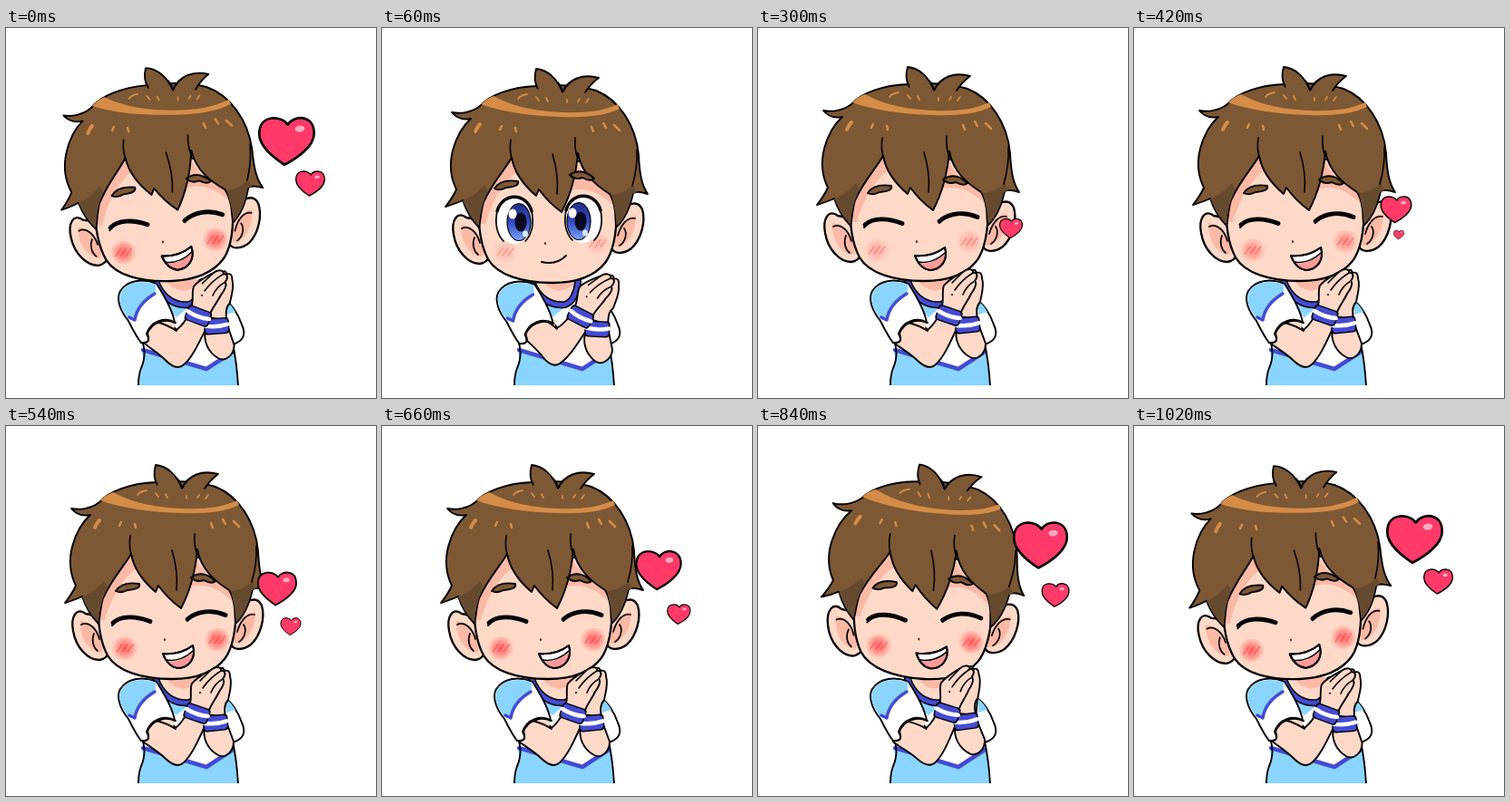
Recreate the animation shown at these times as an HTML page with a canvas. Size 408 by 408 pixels, loop 1.26 s.

```html
<!DOCTYPE html>
<html lang="en">
<head>
<meta charset="utf-8">
<title>Happy boy with hearts</title>
<style>
html, body { margin: 0; width: 100%; height: 100%; overflow: hidden; background: #fff; }
canvas { display: block; width: 408px; height: 408px; }
</style>
</head>
<body>
<canvas id="stage" width="408" height="408"></canvas>
<script>
const ctx = document.getElementById('stage').getContext('2d');
const LOOP = 1260, STEP = 60, LAST = 17;
const INK = '#000', HAIR = '#7d5834', DARK = '#664a30', GLOSS = '#d58c47';
const SKIN = '#fed9c8', SHADE = '#fbb9a6', BLUE = '#8ad5ff', NAVY = '#444bd3';

function shape(d, fill, stroke = INK, width = 1.9) {
  const p = new Path2D(d);
  if (fill) { ctx.fillStyle = fill; ctx.fill(p); }
  if (stroke) { ctx.strokeStyle = stroke; ctx.lineWidth = width; ctx.stroke(p); }
}
const line = (d, width = 1.9, color = INK) => shape(d, null, color, width);
const flat = (d, fill) => shape(d, fill, null);

function oval(x, y, rx, ry, fill, rot = 0) {
  ctx.beginPath();
  ctx.ellipse(x, y, rx, ry, rot, 0, Math.PI * 2);
  ctx.fillStyle = fill;
  ctx.fill();
}

function turned(x, y, angle, draw, dx = 0, dy = 0) {
  ctx.save();
  ctx.translate(x + dx, y + dy);
  ctx.rotate(angle);
  ctx.translate(-x, -y);
  draw();
  ctx.restore();
}

// keys: [step, ...values], linear between neighbours
function track(keys, t) {
  if (t < keys[0][0]) return null;
  let i = 0;
  while (i < keys.length - 2 && t > keys[i + 1][0]) i++;
  const a = keys[i], b = keys[i + 1];
  const k = Math.min(1, (t - a[0]) / (b[0] - a[0]));
  return a.slice(1).map((v, n) => v + (b[n + 1] - v) * k);
}

const BIG = [[4, 273, 231, 18], [5, 279, 221, 26], [9, 299, 179.5, 44],
  [12, 308, 149, 55], [14, 311.5, 131.5, 61], [17, 309.5, 125, 63]];
const SMALL = [[7, 292, 228, 12], [9, 314, 221, 23], [12, 334, 201, 28],
  [14, 328, 186.5, 31], [17, 335.5, 171.5, 33]];
const BLUSH = [[0, .25], [4, .3], [5, .38], [9, 1], [17, 1]];

// head tilt and arm tilt for each held pose
const POSES = {
  left: { head: -.047, arm: .025 },
  open: { head: 0, arm: .15, dx: 5, dy: 2, lift: -3, open: true },
  mid: { head: 0, arm: 0 },
  right: { head: .056, arm: -.035 }
};

function poseAt(s) {
  if (s === LAST) return POSES.left;
  if (s <= 3) return POSES.open;
  return s >= 12 && s <= 14 ? POSES.right : POSES.mid;
}

function torso() {
  flat('M165 282 C178 287 202 286 215 279 C232 284 248 291 253 306 L251 350 C254 366 256 380 256 394 L146 394 C146 378 153 370 152 358 L145 330 Z', '#fff');
  flat('M163 285 L170 304 L188 319 L200 309 Z', BLUE);
  flat('M150 357 L221 377 L252 357 C254 372 256 382 256 394 L146 394 C147 380 154 370 150 357 Z', BLUE);
  line('M151 355 L221 376 L250 357', 4.5, NAVY);
  line('M150 344 C153 353 154 364 149 375 Q146 383 146 394 M250 348 C253 362 255 378 256 395');
  const collar = 'M165 279 C171 297 186 307 202 305 C210 302 215 292 216 280';
  flat(collar, SKIN);
  flat('M176 277 C184 293 206 294 215 277 Z', SHADE);
  line(collar, 8);
  line(collar, 5, NAVY);
  // right sleeve
  shape('M242 300 C249 305 256 316 260 327 C265 338 262 345 250 349 L239 338 Z', '#fff');
  flat('M243 301 C247 304 250 308 253 313 L243 316 Z', BLUE);
}

function sleeve() {
  shape('M166 282 C150 275 133 279 126 290 C121 299 126 312 135 323 C140 333 144 341 149 347 C157 347 159 345 156 337 C160 326 174 319 186 325 C184 311 173 293 166 282 Z', '#fff');
  flat('M165 283 C150 277 134 280 127 291 C123 299 126 309 136 322 L141 321 C143 308 151 300 165 291 Z', BLUE);
  line('M136 319 L142 322 C144 309 152 300 164 293', 3.5, NAVY);
  line('M149 347 C157 348 159 345 155 337 C160 323 175 318 187 325');
}

function band(x, y, angle) {
  turned(x, y, angle, () => {
    const box = (w, h, fill) => {
      ctx.fillStyle = fill;
      ctx.beginPath();
      ctx.roundRect(x - w / 2, y - h / 2, w, h, 4);
      ctx.fill();
    };
    box(28, 18, INK);
    box(25.2, 15.4, NAVY);
    line(`M${x - 12.5} ${y - 1} Q${x} ${y + 2} ${x + 12.5} ${y - 1}`, 4.5, '#fff');
  });
}

function arms() {
  shape('M219 330 C216 345 223 357 234 363 C242 367 251 359 251 348 L244 329 Z', SKIN);
  shape('M156 336 C161 330 175 323 181 326 L187 333 C193 328 198 321 201 312 L223 323 C213 344 206 362 196 371 C190 377 182 373 174 365 C165 357 157 353 150 347 Z', SKIN);
  flat('M155 337 C160 326 175 320 186 325 L184 332 L160 343 Z', SKIN);
  line('M166 325 Q178 328 187 334');
  // hands
  shape('M221 318 C225 299 222 279 234 269 Q239 264 241 270 Q247 268 247 276 C250 285 246 295 245 302 C240 307 241 314 242 321 Z', SKIN);
  shape('M202 309 C206 300 202 291 205 284 C211 277 219 273 226 269 C232 264 238 266 237 270 C242 269 243 274 239 279 C242 281 239 288 235 293 C231 302 224 309 222 319 Z', SKIN);
  line('M237 270 C229 275 221 283 217 289 M239 279 C232 283 228 289 226 294 M226 269 L214 281', 1.6);
  oval(214, 294, 1, 1, INK);
  band(231, 327.5, -.1);
  band(210.5, 317, .33);
}

function blush(x, y, level) {
  const g = ctx.createRadialGradient(x, y, 1, x, y, 15);
  g.addColorStop(0, `rgba(255,70,75,${.75 * level})`);
  g.addColorStop(.5, `rgba(255,95,95,${.52 * level})`);
  g.addColorStop(1, 'rgba(255,130,120,0)');
  oval(x, y, 15, 13, g);
  for (let i = -1; i <= 1; i++) {
    const cx = x + i * 6;
    line(`M${cx - 3} ${y + 4} L${cx + 3} ${y - 4}`, 1.5, `rgba(250,60,70,${.25 + .25 * level})`);
  }
}

function openEye(x, y, side) {
  const ix = x - side * 5, iy = y + 2;
  oval(x, y, 20, 26, '#fff');
  const g = ctx.createLinearGradient(0, iy - 20, 0, iy + 20);
  g.addColorStop(0, '#242e88');
  g.addColorStop(.5, '#3348bd');
  g.addColorStop(1, '#78a2ff');
  oval(ix, iy, 13.6, 21, INK);
  oval(ix, iy, 12.4, 20, g);
  oval(ix + 2, iy, 6.5, 10.5, '#080a20');
  oval(ix - 7, iy - 9, 4.5, 5.5, '#fff');
  oval(ix + 7, iy + 13, 3, 3.5, '#d9e8ff');
  line(`M${x - 19} ${y - 10} C${x - 13} ${y - 31} ${x + 13} ${y - 31} ${x + 19} ${y - 10}`, 3.4);
  for (const k of [-1, 1])
    line(`M${x + k * 19} ${y - 10} C${x + k * 22} ${y + 4} ${x + k * 19} ${y + 16} ${x + k * 12} ${y + 23}`, 1.7);
}

function ears() {
  shape('M88 207 C78 199 71 210 74 226 C77 244 90 258 103 258 Q110 257 114 250 L108 211 Z', SKIN, INK, 2.3);
  flat('M82 215 C92 214 102 226 108 240 L106 250 C92 250 81 234 82 215 Z', SHADE);
  line('M83 219 C91 215 100 223 103 235 M97 229 C94 236 96 244 101 248', 1.7);
  shape('M254 207 C264 190 277 187 282 198 C286 211 281 231 270 241 C261 248 251 247 248 241 Z', SKIN, INK, 2.3);
  flat('M275 205 C264 205 254 216 251 232 L252 240 C266 239 275 223 275 205 Z', SHADE);
  line('M274 208 C265 206 258 216 255 227 M262 219 C266 225 263 234 257 238', 1.7);
}

function hair() {
  flat('M209 142 C214 160 230 172 247 181 L249 193 C236 180 221 173 205 177 L197 188 Z', SHADE);
  flat('M138 140 L146 156 C132 164 118 183 109 214 L100 214 L105 182 Z', SHADE);
  shape('M72 91 C82 93 94 91 103 84 C113 72 138 63 165 62 C188 60 212 61 231 67 C256 77 275 105 278 138 C279 158 281 171 288 181 C281 179 277 178 272 180 C268 198 262 210 253 218 L252 200 Q250 187 246 181 C230 171 215 158 211 136 C209 160 203 182 193 201 Q179 191 168 176 L165 183 C152 172 141 158 138 141 C130 155 117 168 107 190 C104 200 104 208 102 218 C94 210 88 200 84 188 C78 191 72 193 65 195 Q73 185 77 176 C69 160 70 145 73 133 C77 118 84 106 93 98 C84 100 77 97 72 91 Z', HAIR);
  flat('M84 188 C93 185 101 179 108 171 L112 178 C106 190 103 202 102 216 C94 209 89 200 84 188 Z', DARK);
  flat('M248 182 C256 182 265 178 272 171 L276 179 L271 181 C267 198 262 208 254 216 L252 200 Z', DARK);
  // tuft, open at its base
  shape('M167 65 C162 57 163 50 165 43 C177 44 188 53 194 69 C201 54 216 48 234 53 C227 58 223 63 219 69', HAIR);
  flat('M168 62 L166 72 L216 73 L217 66 L194 69 Z', HAIR);
  line('M189 58 Q193 62 194 69 Q197 61 204 57', 1.7);
  flat('M104 82 Q110 76 118 73 C142 86 168 90 194 91 C217 92 238 90 255 82 L257 87 C241 95 217 97 193 96 C160 95 128 91 104 82 Z', GLOSS);
  line('M137 121 Q135 134 139 145 M208 119 Q207 132 211 142 M183 137 Q190 160 188 181 M276 132 Q277 152 271 172', 1.6);
  line('M145 76 Q148 72 155 71 M165 74 L168 78 M176 75 L178 79 M199 77 L199 80 M211 79 L213 76 M220 80 L223 76', 1.8, GLOSS);
  line('M98 112 Q100 107 103 104', 4, GLOSS);
  line('M125 110 L127 106 M142 108 L143 112 M226 107 L228 112 M239 103 L242 108 M251 105 L257 111', 2.5, GLOSS);
}

function brows() {
  shape('M121 182 Q128 171 147 174 Q149 180 134 181 Q127 185 121 182 Z', HAIR);
  shape('M204 167 Q217 158 231 171 Q227 175 218 170 Q210 173 204 167 Z', HAIR);
}

function smile() {
  const lips = 'M173 251 C186 252 197 249 206 242 C210 256 202 266 190 267 C181 266 176 259 173 251 Z';
  shape(lips, '#fff');
  flat('M177 259 C188 261 199 256 206 249 C208 258 201 266 190 267 C183 266 179 263 177 259 Z', '#ff9997');
  line('M177 258 C188 260 199 255 206 248', 1.5);
  line(lips, 2.1);
}

function head(open, level) {
  ears();
  shape('M101 196 C102 218 103 236 112 253 C122 270 149 279 183 279 C211 279 229 272 241 257 C251 244 254 222 254 195 L236 154 L178 132 L122 150 Z', SKIN, INK, 2.3);
  hair();
  blush(131, 245, level);
  blush(233, 235.5, level);
  if (open) {
    openEye(141, 210, -1);
    openEye(217, 209, 1);
    turned(0, 0, 0, brows, -2, -7);
    line('M171 256 Q187 260 198 249', 1.9);
  } else {
    line('M118 217 C126 209 143 209 159 215.5 M200 213 C211 204 227 202 242 208.5', 4.8);
    line('M117 220 L124 213 M200 215 L206 209', 2);
    brows();
    smile();
  }
  oval(175, 235.5, 1.1, 1.5, '#54342a');
}

function heart(at) {
  if (!at) return;
  const [x, y, w] = at;
  ctx.save();
  ctx.translate(x, y);
  ctx.scale(w, w);
  shape('M.02 -.29 C-.07 -.45 -.48 -.49 -.48 -.13 C-.48 .1 -.22 .29 -.04 .41 C.18 .3 .48 .09 .48 -.14 C.48 -.48 .11 -.46 .02 -.29 Z', '#ff3a68', INK, .042);
  oval(.23, -.22, .085, .055, '#ffabc0', -.1);
  ctx.restore();
}

function paint(now) {
  const slot = Math.min(LAST, Math.floor((now % LOOP) / STEP));
  const s = slot || LAST;
  const pose = poseAt(s);
  const [level] = track(BLUSH, s);
  const { dx = 0, dy = 0, lift = 0 } = pose;

  ctx.fillStyle = '#fff';
  ctx.fillRect(0, 0, 408, 408);
  ctx.lineCap = ctx.lineJoin = 'round';
  ctx.save();
  ctx.beginPath();
  ctx.rect(0, 0, 408, 394);
  ctx.clip();
  torso();
  turned(183, 278, pose.head, () => head(pose.open, level), dx, dy);
  turned(185, 374, pose.arm, arms, 0, lift);
  turned(150, 346, 0, sleeve, dx * .5, dy * .5);
  ctx.restore();
  heart(track(BIG, s));
  heart(track(SMALL, s));
}

let start = null;
function tick(now) {
  if (start === null) start = now;
  paint(now - start);
  requestAnimationFrame(tick);
}
paint(0);
requestAnimationFrame(tick);
</script>
</body>
</html>
```
